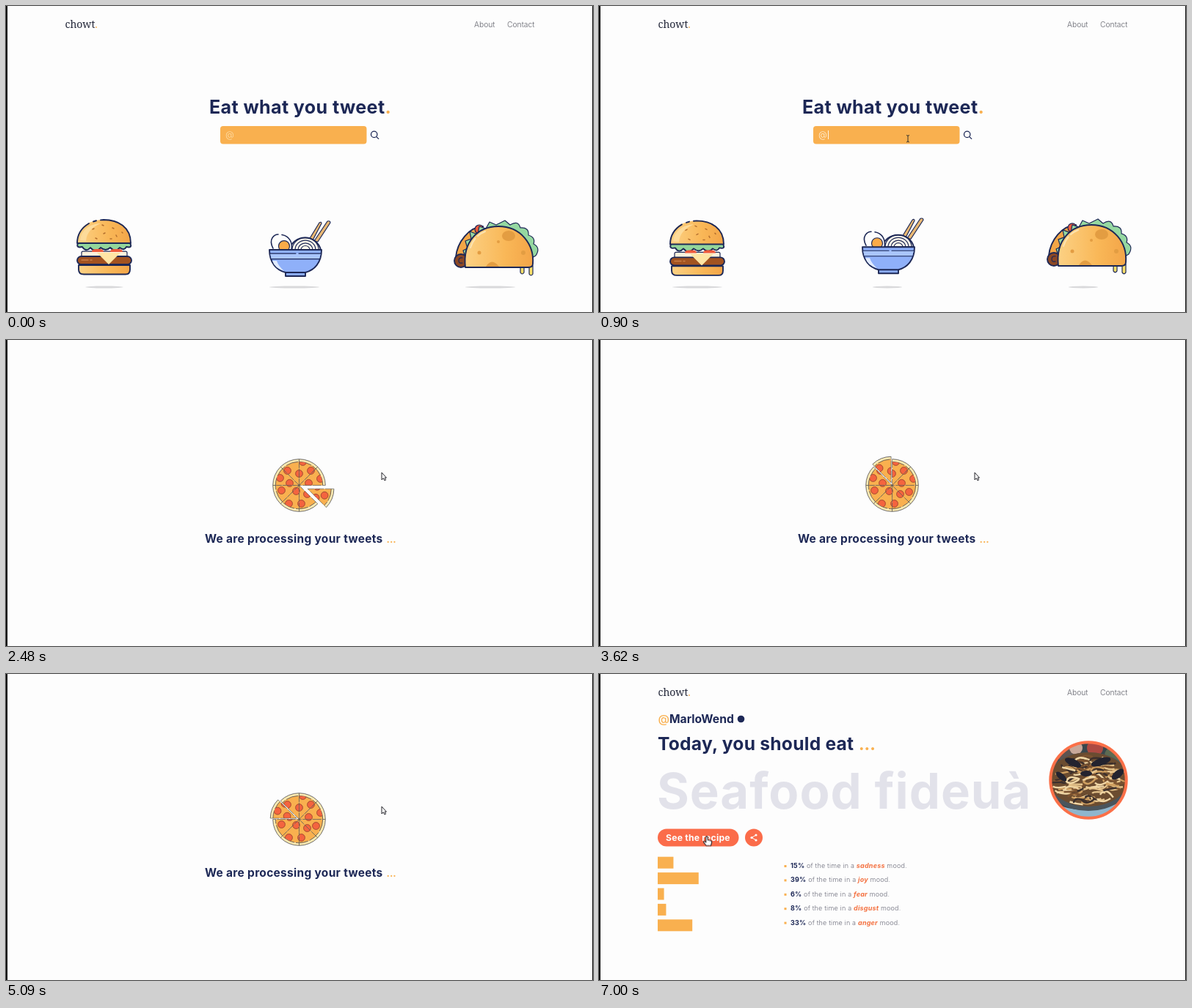
Animation of 800x418 px, one loop 7040 ms. Source, as an HTML page:

```html
<!DOCTYPE html>
<html lang="en">
<head>
<meta charset="utf-8">
<title>Eat what you tweet</title>
<style>
  html, body { margin: 0; width: 100%; height: 100%; overflow: hidden; background: #fdfdfd; }
  svg { position: absolute; left: 0; top: 0; display: block; }
  text, .field { font-family: Inter, "Open Sans", sans-serif; }
  .bold { font-weight: 700; fill: #1d2856; }
  .logo { font: 500 14px "Noto Serif", serif; fill: #24283a; }
  .nav { font-size: 10.3px; font-weight: 300; fill: #62636c; }
  .orange { fill: #f9b04f; }
  .dots { font-weight: 800; fill: #f9b04f; }
  .ink { fill: none; stroke: #1d2856; stroke-width: 1.9; stroke-linecap: round; stroke-linejoin: round; }
  .thin { stroke-width: 1.2; }
  .mood { font-size: 9px; letter-spacing: .2px; font-weight: 300; fill: #6c6d7b; }
  .mood .feel { font-weight: 700; font-style: italic; fill: #f4703f; }
  .field {
    position: absolute; left: 299px; top: 168px; height: 17px; line-height: 16px;
    font-size: 12.2px; font-weight: 300; color: #fde0ae; white-space: nowrap;
  }
  .field.on { color: #fff5e2; }
  .field i { display: none; width: 1px; height: 12px; margin-left: 1px; background: #fff5e2; vertical-align: -2px; }
  .field.on i { display: inline-block; }
  .field.done span { box-shadow: inset 0 -1.3px #e2682c; }

  .scene, .cursor, .bar { animation: 7040ms linear infinite; }
  .home { animation-name: home; animation-timing-function: step-end; }
  .wait { animation-name: wait; animation-timing-function: step-end; }
  .dish { animation-name: dish; animation-timing-function: step-end; }
  .cursor { animation-name: travel; animation-timing-function: ease-in-out; }
  .bar { animation-name: grow; transform-origin: 80px 0; }
  @keyframes home { 0% { visibility: visible } 25.57%, 100% { visibility: hidden } }
  @keyframes wait { 0% { visibility: hidden } 25.57% { visibility: visible } 78.12%, 100% { visibility: hidden } }
  @keyframes dish { 0% { visibility: hidden } 78.12%, 100% { visibility: visible } }
  @keyframes travel {
    0%, 2% { transform: translate(808px, 428px) }
    10.7%, 17% { transform: translate(421px, 181px) }
    20%, 24% { transform: translate(507px, 180px) }
    27%, 80.5% { transform: translate(512px, 181px) }
    90%, 100% { transform: translate(147px, 222.5px) }
  }
  @keyframes grow {
    0%, 78.5% { transform: scaleX(0); animation-timing-function: ease-out }
    92%, 100% { transform: scaleX(1) }
  }
</style>
</head>
<body>
<svg width="800" height="418" viewBox="0 0 800 418">
  <defs>
    <clipPath id="plate"><circle cx="667" cy="145" r="52"/></clipPath>
    <clipPath id="wedge"><path d="M0 0H38A38 38 0 0 1 26.87 26.87Z"/></clipPath>
    <clipPath id="cheese"><circle r="32"/></clipPath>
    <linearGradient id="crust" x2="1">
      <stop offset="0" stop-color="#fcd184"/><stop offset=".6" stop-color="#f9b757"/><stop offset="1" stop-color="#f3a548"/>
    </linearGradient>
    <path id="hand" d="M-1.2 0Q0-1.3 1.2 0V4.2L5.5 5.2Q7 5.8 6.6 7.6L5.5 12H-.8L-4.4 7.4Q-4.6 5.6-2.9 6L-1.2 7.4Z"
      fill="#fdfdfd" stroke="#26262c" stroke-width="1.1" stroke-linejoin="round"/>
  </defs>

  <g class="scene home">
    <text class="bold" x="277" y="147" font-size="25.1" letter-spacing=".36">Eat what you tweet<tspan class="orange">.</tspan></text>
    <rect x="292" y="164" width="199.5" height="24.5" rx="4" class="orange"/>
    <g class="ink" style="stroke-width:1.3"><circle cx="501.7" cy="175.4" r="4.2"/><path d="M504.8 178.6l2.9 2.8"/></g>
    <g fill="#d9d9db" id="shadows">
      <ellipse cx="134" cy="384" ry="1.5"/>
      <ellipse cx="393" cy="384" ry="1.5"/>
      <ellipse cx="660" cy="384" ry="1.5"/>
    </g>

    <g class="ink" id="burger">
      <path d="M98 324Q95 331 104 329Q109 337 115 330Q122 338 129 330Q136 336 142 330Q149 337 155 330Q161 335 164 329Q173 331 169 324Z" fill="#92d69b"/>
      <rect x="103" y="335" width="62" height="8" rx="2" fill="#fff3dd" class="thin"/>
      <path d="M117 336q0-4 6-4h4q6 0 6 4zM142 336q0-4 6-4h5q6 0 6 4z" fill="#ee5a3c" stroke="none"/>
      <rect x="97" y="342" width="74" height="11" rx="5.5" fill="#a35320"/>
      <path d="M124 337H156L140 353Z" fill="#ffe5a4" stroke="none"/>
      <path d="M103 347h9M115 347h2" stroke="#cc8048" stroke-width="1.5"/>
      <path d="M99 354H169V360Q169 366.500 163 366.500H106Q99 366.500 99 360Z" fill="url(#crust)"/>
      <path d="M97 324C97 302 113 292 133 292S170 302 170 324Z" fill="url(#crust)" stroke="none"/>
      <path d="M101 320C102 306 115 297 129 297Q110 305 109 321Z" fill="#fddb9a" stroke="none"/>
      <path d="M113 297C103 303 97 311 97 324H170C170 302 153 292 133 292L129 292.300M119 294.500l4-1.300"/>
      <path d="M118 305l2-1M131 299l2 1M145 303l2 1M133 311l2-1M122 317l2 1M150 313l1 2M158 309l1 1M142 318l2 0" stroke="#b4702f" stroke-width="1.5"/>
    </g>

    <g class="ink" id="bowl">
      <path d="M413 319L427 296q3-2 3 1L418 320ZM420 321L438 294q4-1 4 2L425 322Z" fill="#e9b873" class="thin"/>
      <path d="M386 333A22 21 0 0 1 429 333Z" fill="#fff9ec"/>
      <g id="noodles" class="thin"></g>
      <path d="M364 333C357 318 366 311 375 312.500C386 314 391 323 389 333Z" fill="#fdfdfd" stroke="none"/>
      <path d="M364 331C357 318 366 312 371 312M376 312.500C386 314 391 323 389 333" stroke-width="1.6"/>
      <circle cx="379" cy="328" r="7.5" fill="#fbab48" class="thin"/>
      <path d="M381 363H408V369H381Z" fill="#8bacf6"/>
      <path d="M359 333H430C430 351 420 361 408 364H381C369 361 359 351 359 333Z" fill="#8fb0f9"/>
      <path d="M360 338H429L427 345H361.500Z" fill="#a9c5fd" stroke="none"/>
      <path d="M363 348Q366 358 379 362Q371 355 369 348Z" fill="#e1ebff" stroke="none"/>
      <path d="M360 338H395M399 338H429M362 345.500H427" class="thin"/>
    </g>

    <g class="ink" id="taco">
      <path d="M701 355v9q2.500 4 5 0v-9M713 355v11q2.500 4 5 0v-11" fill="#fbe06a" class="thin"/>
      <path d="M613 343C615 322 631 302 650 301L640 350Z" fill="#f4a646"/>
      <circle cx="645" cy="305" r="6" fill="#ee5a3c" class="thin"/>
      <path d="M626 343L623 334L629 331L626 321L634 318L632 308L643 312L645 301L654 304L659 295L668 299L680 293L687 299Q698 292 701 303Q713 302 712 313Q722 316 719 325Q729 330 722 341L715 345Z" fill="#95d8a1" class="thin"/>
      <circle cx="620" cy="348" r="9" fill="#8c4824"/>
      <path d="M622 344q-5-1-5 4q0 4 5 3" class="thin"/>
      <path d="M626 357C622 322 643 301 671 301C702 301 720 326 718 352Q718 357 712 357Z" fill="url(#crust)"/>
      <path d="M633 330Q638 314 653 308" stroke="#fde3b0" stroke-width="2.200" stroke-dasharray="14 5"/>
      <g fill="#e39d42" stroke="none">
        <ellipse cx="685" cy="314" rx="9" ry="7"/><circle cx="645" cy="337" r="2.500"/><circle cx="671" cy="322" r="2"/>
        <circle cx="705" cy="337" r="3"/><path d="M654 356q8-13 18 0z"/>
      </g>
    </g>
  </g>

  <g class="scene wait">
    <g id="pizza" transform="translate(399.5 198.5)"></g>
    <text class="bold" x="271" y="276.500" font-size="15.5" letter-spacing=".29">We are processing your tweets</text>
    <text class="dots" x="518.5" y="276.500" font-size="12.5">...</text>
  </g>

  <g class="scene dish">
    <text x="80.5" y="66.500" class="bold" font-size="15.7"><tspan class="orange" font-weight="500">@</tspan><tspan id="handle"></tspan></text>
    <circle cx="193.5" cy="61.500" r="4.8" fill="#1d2856"/>
    <text class="bold" x="80" y="104" font-size="24.6" letter-spacing=".24">Today, you should eat</text>
    <text class="dots" x="354" y="104" font-size="21.5">...</text>
    <text class="bold" style="fill:#e2e2ea" x="79" y="184" font-size="67" letter-spacing=".95">Seafood fideuà</text>
    <rect x="80" y="211.500" width="110.500" height="24" rx="12" fill="#fb6c4a"/>
    <text class="bold" style="fill:#fdfdfd" x="91" y="228" font-size="12.2" letter-spacing=".2">See the recipe</text>
    <circle cx="211" cy="223.500" r="12" fill="#fb6c4a"/>
    <path d="M214 220L208 223.500L214 227" fill="none" stroke="#fdfdfd"/>
    <g fill="#fdfdfd"><circle cx="214" cy="220" r="1.6"/><circle cx="208" cy="223.500" r="1.6"/><circle cx="214" cy="227" r="1.6"/></g>
    <g id="stats"></g>
    <g clip-path="url(#plate)">
      <rect x="610" y="90" width="114" height="110" fill="#39474c"/>
      <circle cx="638" cy="108" r="14" fill="#5d5350"/>
      <circle cx="650" cy="101" r="9" fill="#c8a89a"/>
      <circle cx="676" cy="101" r="11" fill="#ad4a42"/>
      <circle cx="703" cy="112" r="14" fill="#5d6a52"/>
      <path d="M610 172Q667 202 724 168V202H610Z" fill="#8fb6cd"/>
      <ellipse cx="667" cy="147" rx="58" ry="40" fill="#4b555c"/>
      <ellipse cx="667" cy="144" rx="54" ry="37" fill="#6b4c30"/>
      <g id="pasta" fill="none" stroke-width="2.4"></g>
      <g fill="#23232f">
        <ellipse cx="646" cy="121" rx="12" ry="5" transform="rotate(25 646 121)"/>
        <ellipse cx="684" cy="120" rx="14" ry="5" transform="rotate(-18 684 120)"/>
        <ellipse cx="630" cy="140" rx="9" ry="4" transform="rotate(40 630 140)"/>
        <ellipse cx="707" cy="137" rx="10" ry="5" transform="rotate(-40 707 137)"/>
        <ellipse cx="664" cy="136" rx="8" ry="4"/>
      </g>
    </g>
    <circle cx="667" cy="145" r="51.700" fill="none" stroke="#fb7048" stroke-width="4"/>
  </g>

  <g class="scene home head"></g>
  <g class="scene dish head"></g>
  <path d="M0 0H2V418H0ZM799 0H800V418H799Z" fill="#111"/>
</svg>

<div class="field scene home" id="field">@<span id="typed"></span><i></i></div>

<svg width="800" height="418" viewBox="0 0 800 418">
  <g class="cursor">
    <path id="arrow" d="M0 0V10L2.300 7.800L4 11L5.600 10.200L4.100 7.200H6.500Z" fill="#fdfdfd" stroke="#26262c"/>
    <path id="beam" d="M-2-4.500Q0-4.500 0-3Q0-4.500 2-4.500M0-3V4M-2 5Q0 5 0 3.500Q0 5 2 5" fill="none" stroke="#38342c"/>
    <use id="point" href="#hand"/>
  </g>
</svg>

<script>
const LOOP = 7040;
const NAME = "MarloWend";
const $ = id => document.getElementById(id);
const times = (n, make) => Array.from({ length: n }, (_, i) => make(i)).join("");

for (const head of document.querySelectorAll(".head")) {
  head.innerHTML = `<text class="logo" x="80.5" y="30">chowt<tspan class="orange">.</tspan></text>
    <text class="nav" x="638" y="28.5">About</text><text class="nav" x="683" y="28.5">Contact</text>`;
}
$("handle").textContent = NAME;

$("noodles").innerHTML = times(4, i => {
  const r = 18 - i * 4;
  return `<path d="M${408 - r} 333A${r} ${r * 0.92} 0 0 1 ${408 + r} 333"/>`;
});

// Pizza: one whole pie, shown through eight wedges
const toppings = [[-16, -20], [0, -16], [16, -20], [5, -32], [-26, -10], [-13, -3], [13, -3], [29, -9],
  [-24, 7], [-4, 8], [11, 12], [23, 9], [-14, 25], [3, 25]];
const pie = `<circle r="35.8" fill="#fdeab2" stroke="#4a4a4c" stroke-width=".8"/>
  <circle r="32.2" fill="#f9b04f" stroke="#4a4a4c" stroke-width=".8" stroke-dasharray="17 2"/>
  <g clip-path="url(#cheese)" fill="#f4643f" stroke="#99452f" stroke-width=".9">
  ${toppings.map(([x, y]) => `<circle cx="${x}" cy="${y}" r="4.9"/>`).join("")}</g>`;
$("pizza").innerHTML = times(8, i => `<g><g clip-path="url(#wedge)" transform="rotate(${i * 45})">
  <g transform="rotate(${-i * 45})">${pie}</g></g>
  <path d="M35.8 0H0L25.3 25.3" transform="rotate(${i * 45})" fill="none" stroke="#4a4a4c" stroke-width=".6" stroke-dasharray="12 1.5"/></g>`);
const slices = [...$("pizza").children];

const moods = [[15, "sadness"], [39, "joy"], [6, "fear"], [8, "disgust"], [33, "anger"]];
$("stats").innerHTML = moods.map(([share, feel], i) => {
  const y = 265 + i * 19.4;
  return `<rect class="bar orange" x="80" y="${249.7 + i * 21.4}" width="${share * 1.43}" height="16"/>
    <rect class="orange" x="252.5" y="${y - 4}" width="3" height="3"/>
    <text class="mood" x="261" y="${y}"><tspan class="bold">${share}%</tspan> of the time in a <tspan class="feel">${feel}</tspan> mood.</text>`;
}).join("");

let seed = 7;
const rand = () => (seed = (seed * 16807) % 2147483647) / 2147483647;
const tones = ["#cf9f60", "#e6c48c", "#7d5330", "#f0d7a6", "#3b2f2c"];
$("pasta").innerHTML = times(110, i => {
  const a = rand() * 6.28, d = Math.sqrt(rand());
  const x = 667 + 44 * d * Math.cos(a), y = 146 + 31 * d * Math.sin(a);
  return `<path d="M${x - 9} ${y}q${rand() * 9} ${rand() * 24 - 12} 18 ${rand() * 10 - 5}" stroke="${tones[i % 5]}"/>`;
});

const wave = (t, peak, period) => Math.cos(2 * Math.PI * (t - peak) / period);
const shadows = $("shadows").children;

function floatFood(i, id, lift, rest, width, swing, c) {
  $(id).setAttribute("transform", `translate(0 ${lift * (c - rest)})`);
  shadows[i].setAttribute("rx", (width + swing * c) / 2);
}

function draw(t) {
  const slow = wave(t, 100, 1500);
  floatFood(0, "burger", 1, -0.4, 56, 12, wave(t, 930, 1350));
  floatFood(1, "bowl", 2, 0.9, 55, 15, slow);
  floatFood(2, "taco", 1.1, 0.9, 55, 15, slow);

  const count = Math.max(0, Math.min(NAME.length, Math.floor((t - 930) / 45)));
  $("typed").textContent = NAME.slice(0, count);
  $("field").classList.toggle("on", t >= 780);
  $("field").classList.toggle("done", count === NAME.length);

  // Each slice slides out and back in turn, clockwise
  const step = (t - 2380) / 210 + 16;
  const active = Math.floor(step) % 8;
  slices.forEach((slice, i) => {
    const d = i === active ? 12.6 * Math.sin(Math.PI * (step % 1)) : 0;
    const a = (i + 0.5) * Math.PI / 4;
    slice.setAttribute("transform", `translate(${d * Math.cos(a)} ${d * Math.sin(a)})`);
  });

  const kind = t < 640 ? "arrow" : t < 1370 ? "beam" : t < 1800 || t > 6220 ? "point" : "arrow";
  for (const id of ["arrow", "beam", "point"]) $(id).style.display = id === kind ? "" : "none";
}

let start;
function tick(now) {
  start ??= now;
  draw((now - start) % LOOP);
  requestAnimationFrame(tick);
}
draw(0);
requestAnimationFrame(tick);
</script>
</body>
</html>
```
